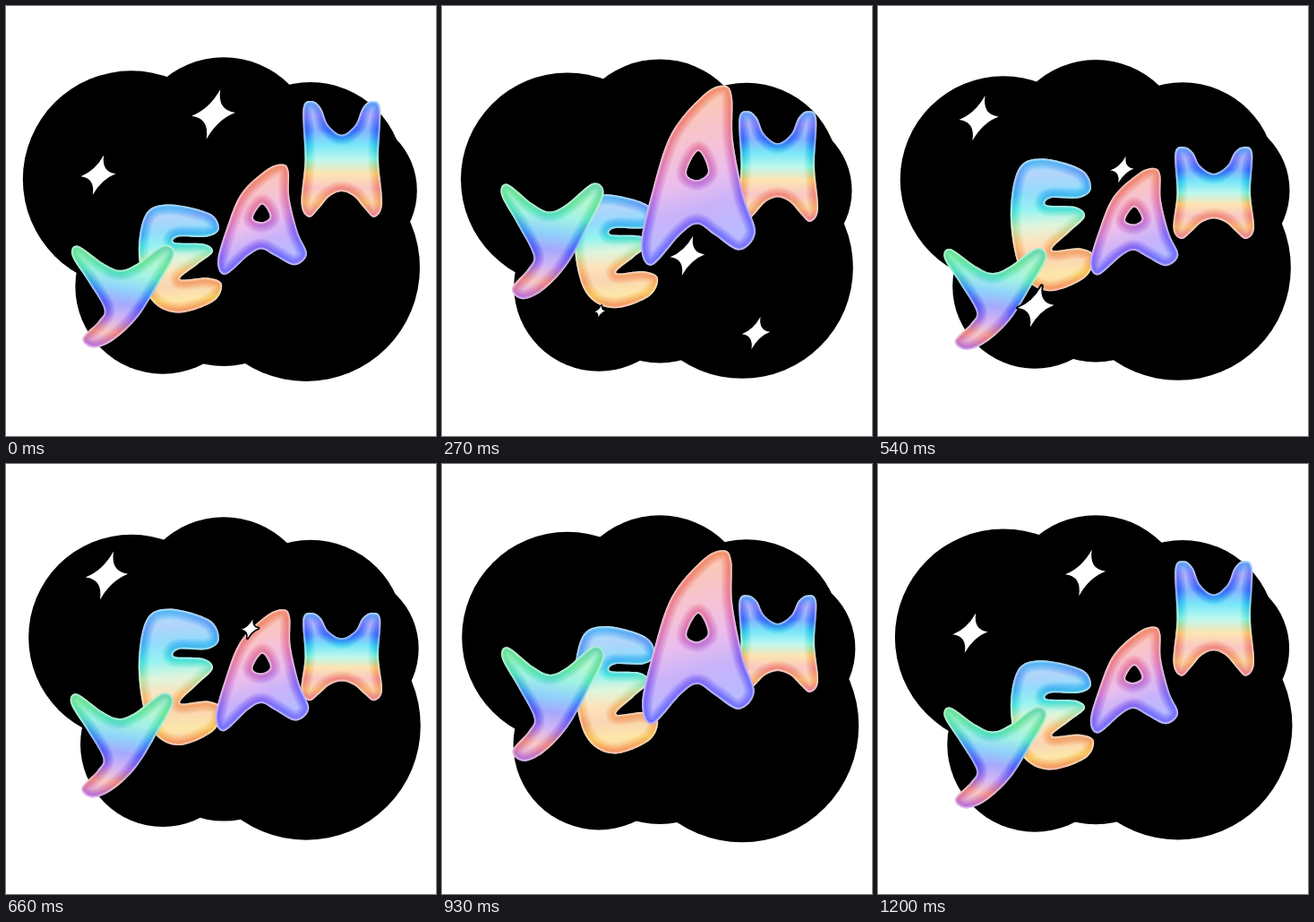
An HTML page with a canvas that plays this animation: 480x480 px, repeating every 1230 ms.

```html
<!DOCTYPE html>
<html lang="en">
<head>
<meta charset="utf-8">
<title>Yeah</title>
<style>
  html, body { margin: 0; width: 100%; height: 100%; overflow: hidden; background: #fff; }
  canvas { display: block; width: 100vw; height: 100vh; }
</style>
</head>
<body>
<canvas id="stage" width="480" height="480"></canvas>
<script>
const ctx = document.getElementById('stage').getContext('2d');
const LOOP = 1230, STEP = 30, TAU = Math.PI * 2;

// Cosine wave that peaks at `peak` ms and runs `cycles` times per loop.
const wave = (t, peak, cycles = 1) => Math.cos(TAU * cycles * (t - peak) / LOOP);
const slow = t => wave(t, 80), fast = t => wave(t, 258, 2);

// x, y, radius, swell
const puffs = [
  [140, 193.5, 118, 3.2], [243, 161, 102.5, 1.6], [340, 189, 104, .8], [376, 206, 83.5, 2],
  [335, 292, 127, 3.2], [243, 300.5, 99.5, 2.8], [175, 313, 94.7, 3], [250, 240, 130, 0]
];

// x, base y, size, start time
const sparkles = [
  [350.5, 371, 18.6, 25], [274, 286, 22, 60], [176.3, 343, 29.5, 240], [272.5, 187.5, 15, 345],
  [112.5, 133.5, 29, 400], [103, 196, 22.3, 1005], [231.5, 130, 28.5, 1050]
];
const SPARKLE_LIFE = 420, LIFT = .33;

// The right half of the H, mirrored to the left.
const half = [[0, 38], [15, 27], [23, 8], [33, 0], [43, 9], [41, 66], [45, 116], [36, 131], [25, 121], [14, 108], [0, 102]];
const mirrored = half.slice(1, -1).reverse().map(([x, y]) => [-x, y]);

// edges: left, top, right, bottom as [middle, swing] of the beat.
const letters = [
  {
    beat: slow,
    edges: [[148, 0], [192.5, 31.5], [241, 0], [328.8, 15]],
    rings: [[
      [182, 167], [226, 179], [237, 200], [224, 211], [193, 211], [188, 219], [220, 221], [230, 232],
      [213, 249], [194, 269], [224, 267], [240, 276], [230, 300], [190, 315], [160, 294], [148, 235], [156, 180]
    ]],
    axis: [.4, 0, .5, 1],
    colors: ['#a4e4fb', '#b2d4fb', '#92dcfb', '#96f3f1', '#dff5dc', '#fce3bd', '#fad5b4', '#fce7a8', '#fbcdb4']
  },
  {
    beat: slow,
    edges: [[329.5, 0], [135, -31.5], [420, 0], [249.5, -15]],
    rings: [[...half, ...mirrored]],
    axis: [.5, 0, .5, 1],
    colors: ['#a9dafc', '#bcbefc', '#86b2fd', '#78e6f8', '#bdf8ee', '#fde4b2', '#f9c8c4', '#fbdcb4', '#f6c0d4']
  },
  {
    beat: fast,
    edges: [[229.5, -7.5], [135.5, -47], [342.5, 7.5], [295, -5.5]],
    rings: [[
      [315, 89], [324, 102], [325, 150], [337, 212], [350, 252], [332, 272], [304, 255], [285, 243],
      [266, 255], [234, 289], [222, 266], [235, 205], [256, 142], [292, 99]
    ], [
      [286, 162], [297, 184], [285, 194], [273, 186]
    ]],
    axis: [.35, 0, .8, 1],
    colors: ['#fbd4b2', '#f9c6bc', '#f6c2d6', '#ebbeec', '#c8b2fa', '#b9baff', '#c6bdfb']
  },
  {
    beat: fast,
    edges: [[70, -4], [234.5, -37], [184.5, -4], [356, -29]],
    rings: [[
      [73, 198], [101, 220], [120, 229], [139, 221], [169, 197], [181, 209], [163, 247], [140, 289],
      [113, 318], [90, 328], [78, 316], [96, 294], [102, 278], [84, 243], [66, 210]
    ]],
    axis: [.55, 0, .4, 1],
    colors: ['#b4f0dc', '#b4f5d2', '#a2f2e4', '#90d2fa', '#a5a9fc', '#d4b5f4', '#f8c6c4', '#e3baf0']
  }
];

// Smooth closed curve through the points.
function addRing(path, pts) {
  const n = pts.length, at = i => pts[(i + n) % n];
  path.moveTo(...pts[0]);
  for (let i = 0; i < n; i++) {
    const [a, b, c, d] = [at(i - 1), at(i), at(i + 1), at(i + 2)];
    path.bezierCurveTo(
      b[0] + (c[0] - a[0]) / 6, b[1] + (c[1] - a[1]) / 6,
      c[0] - (d[0] - b[0]) / 6, c[1] - (d[1] - b[1]) / 6, c[0], c[1]);
  }
  path.closePath();
}

for (const l of letters) {
  l.shape = new Path2D();
  l.rings.forEach(r => addRing(l.shape, r));
  const [xs, ys] = [0, 1].map(k => l.rings[0].map(p => p[k]));
  l.box = [Math.min(...xs), Math.min(...ys), Math.max(...xs), Math.max(...ys)];
}

function stroke(path, width, alpha) {
  ctx.lineWidth = width;
  ctx.globalAlpha = alpha;
  ctx.stroke(path);
}

function drawLetter({ beat, edges, shape, box, axis, colors }, t) {
  const b = beat(t);
  const [x0, y0, x1, y1] = edges.map(([mid, swing]) => mid + swing * b);
  const w = x1 - x0, h = y1 - y0;
  const sx = w / (box[2] - box[0]), sy = h / (box[3] - box[1]);
  const path = new Path2D();
  path.addPath(shape, new DOMMatrix([sx, 0, 0, sy, x0 - box[0] * sx, y0 - box[1] * sy]));

  const [ax, ay, ex, ey] = axis;
  const sheen = ctx.createLinearGradient(x0 + ax * w, y0 + ay * h, x0 + ex * w, y0 + ey * h);
  colors.forEach((c, i) => sheen.addColorStop(i / (colors.length - 1), c));

  ctx.save();
  ctx.clip(path, 'evenodd');
  ctx.lineJoin = 'round';
  ctx.fillStyle = ctx.strokeStyle = sheen;
  ctx.fillRect(x0 - 4, y0 - 4, w + 8, h + 8);
  // Multiplying the sheen with itself deepens it towards the edge.
  ctx.globalCompositeOperation = 'multiply';
  for (let width = 24; width >= 8; width -= 2) stroke(path, width, .2);
  ctx.globalCompositeOperation = 'source-over';
  ctx.strokeStyle = '#fff';
  stroke(path, 5, .2);
  stroke(path, 2.4, .45);
  ctx.restore();
}

function drawSparkle([x, y, size, start], t) {
  const age = (t - start + LOOP) % LOOP;
  if (age <= 0 || age >= SPARKLE_LIFE) return;
  const r = size * Math.sin(Math.PI * age / SPARKLE_LIFE);
  const cy = y - LIFT * r;
  const p = new Path2D();
  const curve = (a, b, c, d) => p.quadraticCurveTo(x + a * r, cy + b * r, x + c * r, cy + d * r);
  p.moveTo(x + .28 * r, cy - r);
  for (const s of [1, -1]) {
    curve(.15 * s, -.15 * s, .88 * s, -.07 * s);
    curve(.17 * s, .2 * s, -.28 * s, s);
  }
  p.closePath();
  ctx.lineJoin = 'round';
  ctx.strokeStyle = '#000';
  ctx.lineWidth = Math.min(4, 1 + r * .2);
  ctx.stroke(p);
  ctx.fillStyle = '#fff';
  ctx.fill(p);
}

function drawPuff([x, y, r, swell], t) {
  // The swelling passes from right to left.
  ctx.beginPath();
  ctx.arc(x, y, r + swell * wave(t, 260 - 1.7 * x), 0, TAU);
  ctx.fill();
}

function draw(t) {
  ctx.fillStyle = '#fff';
  ctx.fillRect(0, 0, 480, 480);
  ctx.fillStyle = '#000';
  puffs.forEach(p => drawPuff(p, t));
  letters.forEach(l => drawLetter(l, t));
  sparkles.forEach(s => drawSparkle(s, t));
}

const begin = performance.now();
function tick() {
  const t = (performance.now() - begin) % LOOP;
  draw(Math.floor(t / STEP) * STEP);
  requestAnimationFrame(tick);
}
tick();
</script>
</body>
</html>
```
